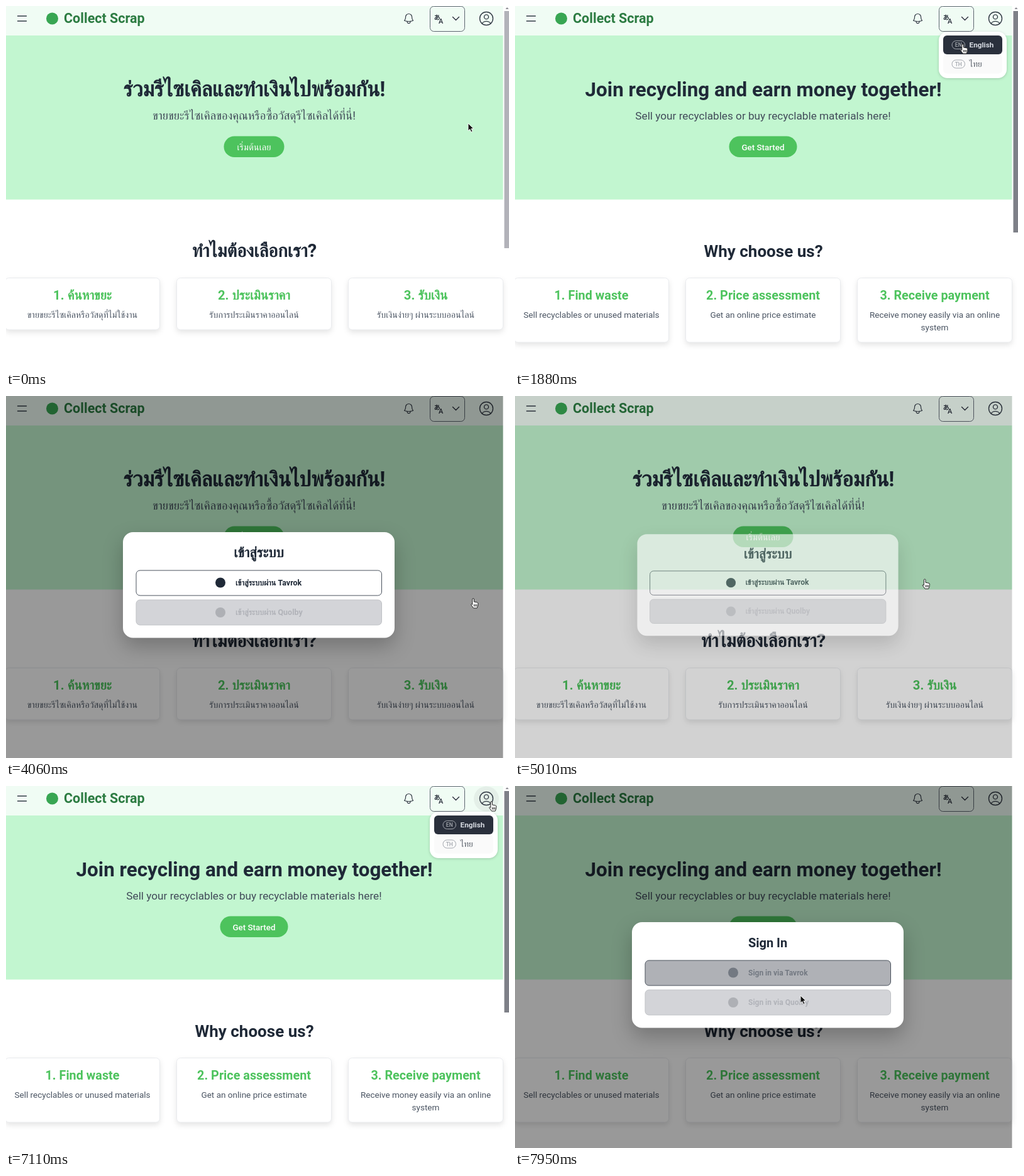
Write an HTML page that moves like this. It is 800 px wide and 577 px high and loops after 8000 ms.

```html
<!DOCTYPE html>
<html lang="th">
<head>
<meta charset="utf-8">
<style>
  html, body { margin: 0; width: 100%; height: 100%; overflow: hidden; background: #fff; }
  svg { display: block; width: 100vw; height: 100vh; }
  text { font-family: Roboto, 'Noto Sans', Loma, sans-serif; white-space: pre; }
  .line { fill: none; stroke: #323a45; stroke-width: 1.4; stroke-linecap: round; stroke-linejoin: round; }
  .card { fill: #fff; stroke: #e9ebee; filter: drop-shadow(0 4px 4px rgba(0, 0, 0, .1)); }
  #box { filter: drop-shadow(0 14px 16px rgba(0, 0, 0, .24)); }
  #menuBox { filter: drop-shadow(0 1px 2px rgba(0, 0, 0, .18)); }
  .badge { fill: none; stroke: #a3a7ae; }
</style>
</head>
<body>
<svg id="stage" viewBox="0 0 800 577"></svg>
<script>
const LOOP = 8000, DARK = '#1f2937', GREEN = '#4dc35d';
const stage = document.getElementById('stage');

const text = (x, y, size, weight, fill, str, anchor = 'middle') =>
  `<text x="${x}" y="${y}" font-size="${size}" font-weight="${weight}" fill="${fill}" text-anchor="${anchor}">${str}</text>`;
const rect = (x, y, w, h, r, attrs) =>
  `<rect x="${x}" y="${y}" width="${w}" height="${h}" rx="${r}" ${attrs}/>`;

const langs = {
  th: {
    size: { title: 33.8, sub: 18.6, start: 14.6, why: 29, head: 20.3, body: 14.2, signIn: 22, via: 12.5 },
    title: 'ร่วมรีไซเคิลและทำเงินไปพร้อมกัน!',
    sub: 'ขายขยะรีไซเคิลของคุณหรือซื้อวัสดุรีไซเคิลได้ที่นี่!',
    start: 'เริ่มต้นเลย', startW: 96, why: 'ทำไมต้องเลือกเรา?', cardH: 82.5,
    cards: [['1. ค้นหาขยะ', 'ขายขยะรีไซเคิลหรือวัสดุที่ไม่ใช้งาน'],
            ['2. ประเมินราคา', 'รับการประเมินราคาออนไลน์'],
            ['3. รับเงิน', 'รับเงินง่ายๆ ผ่านระบบออนไลน์']],
    signIn: 'เข้าสู่ระบบ', via: 'เข้าสู่ระบบผ่าน ', iconX: 341, viaX: 365
  },
  en: {
    size: { title: 31.4, sub: 17.2, start: 13.4, why: 26, head: 19.8, body: 13.55, signIn: 20, via: 12 },
    title: 'Join recycling and earn money together!',
    sub: 'Sell your recyclables or buy recyclable materials here!',
    start: 'Get Started', startW: 108, why: 'Why choose us?', cardH: 102.5,
    cards: [['1. Find waste', 'Sell recyclables or unused materials'],
            ['2. Price assessment', 'Get an online price estimate'],
            ['3. Receive payment', 'Receive money easily via an online', 'system']],
    signIn: 'Sign In', via: 'Sign in via ', iconX: 347, viaX: 371
  }
};

function page(id) {
  const L = langs[id], s = L.size;
  return `<g class="${id}">` +
    text(395, 144, s.title, 700, DARK, L.title) +
    text(394.5, 181, s.sub, 400, '#414b59', L.sub) +
    rect(394.5 - L.startW / 2, 207.5, L.startW, 33.5, 16.75, `fill="${GREEN}"`) +
    text(394.5, 229.5, s.start, 500, '#fff', L.start) +
    text(395, 399.5, s.why, 700, DARK, L.why) +
    L.cards.map(([head, ...lines], i) => {
      const x = -1.5 + 273 * i, mid = x + 123;
      return rect(x, 433.5, 246, L.cardH, 6, 'class="card"') +
        text(mid, 468, s.head, 700, GREEN, head) +
        lines.map((l, n) => text(mid, 497 + 20 * n, s.body, 400, '#4b5563', l)).join('');
    }).join('') + '</g>';
}

function dialog(id) {
  const L = langs[id], s = L.size;
  return `<g class="${id}">` + text(402, 257, s.signIn, 700, DARK, L.signIn) +
    `<g class="hub" fill="${DARK}"><circle cx="${L.iconX}" cy="297.5" r="8"/>` +
    text(L.viaX, 301.5, s.via, 700, 'inherit', L.via + 'Tavrok', 'start') + '</g>' +
    `<circle cx="${L.iconX}" cy="345" r="8" fill="#aeb0b5"/>` +
    text(L.viaX, 348.5, s.via, 700, '#b1b3b9', L.via + 'Quolby', 'start') + '</g>';
}

const item = (id, y, code, name, size, weight) => `<g id="${id}">` +
  rect(681, y, 94, 30, 6, 'class="fill"') + rect(695, y + 8.5, 20.5, 13, 6.5, 'class="badge"') +
  text(705.3, y + 18.2, 8.5, 500, '#a3a7ae', code) + text(722.5, y + 19, size, weight, 'inherit', name, 'start') + '</g>';

stage.innerHTML =
  rect(0, 0, 790.5, 47, 0, 'fill="#f0fcf4"') + rect(0, 47, 790.5, 261.5, 0, 'fill="#c2f6d0"') +
  '<path class="line" d="M18.5 16h14M18.5 24h14"/>' +
  '<circle cx="73.5" cy="20" r="9.5" fill="#38a653"/>' +
  text(92, 27, 21.5, 700, '#2c7c42', 'Collect Scrap', 'start') +
  '<path class="line" transform="translate(630.5 10) scale(.84)" d="M14.86 17.08a23.85 23.85 0 005.45-1.31A8.97 8.97 0 0118 9.75V9A6 6 0 006 9v.75a8.97 8.97 0 01-2.31 6.02c1.73.64 3.56 1.09 5.45 1.31m5.72 0a24.26 24.26 0 01-5.72 0m5.72 0a3 3 0 11-5.72 0"/>' +
  rect(674.5, .5, 55, 40, 6, 'id="langBtn" fill="#2a303c" stroke="#5d6570"') +
  '<g id="langIcon">' + text(685.5, 22, 10, 700, 'inherit', 'あ') + text(691.7, 28, 11, 500, 'inherit', 'A') +
  '<path class="line" id="chevron" d="M710.5 17.5l5 5 5-5"/></g>' +
  '<circle id="halo" cx="764" cy="20.5" r="20"/>' +
  '<g class="line"><circle cx="764" cy="20" r="10.5"/><circle cx="764" cy="17.4" r="3.5"/><path d="M757 27.9a8.74 8.74 0 0114 0"/></g>' +
  page('th') + page('en') +
  '<g id="menu">' + rect(674, 41, 108, 74, 14, 'id="menuBox" fill="#fff"') +
  item('itemEn', 47, 'EN', 'English', 11.8, 700) + item('itemTh', 77.5, 'TH', 'ไทย', 13.5, 400) + '</g>' +
  '<rect id="dim" width="790.5" height="577"/>' +
  '<g id="bar"><path d="M794.5 5l2.5-3 2.5 3z" fill="#8a8a90"/>' + rect(792.5, 8, 7.5, 378, 0, 'id="thumb"') + '</g>' +
  '<g id="modal">' + rect(186, 217, 432, 168.5, 16, 'id="box" fill="#fff"') +
  rect(207, 278, 390.5, 40, 6, 'id="hubBtn" stroke="#4a525d"') +
  rect(207, 325, 390.5, 40, 6, 'fill="#d3d4d8" stroke="#bfc1c5"') + dialog('th') + dialog('en') + '</g>' +
  '<path id="arrow" d="M0 0v12l2.8-2.6 2 4.6 2.2-1-2-4.4h3.8z" fill="#111" stroke="#fff" stroke-width=".9"/>' +
  '<path id="hand" d="M-1.2 8V1a1.3 1.3 0 012.6 0v4l5 1q1.6.4 1.5 2l-.6 4-1.2 3H.5L-3.5 9.5q.4-2 2.3 0zM1.5 9v3.5M3.5 9v3.5M5.5 9v3.5" fill="#fff" stroke="#222" stroke-width="1"/>';

const $ = id => document.getElementById(id);
const clamp = v => Math.min(1, Math.max(0, v));
// Rises over d ms from a and falls over d ms from b.
const pulse = (t, a, b, d = 200) => clamp((t - a) / d) - clamp((t - b) / d);
const mix = (a, b, k) => `rgb(${a.map((v, i) => Math.round(v + (b[i] - v) * k))})`;
const WHITE = [255, 255, 255], INK = [42, 48, 60], TEXT = [31, 41, 55];

// time, x, y of the pointer tip
const path = [
  [70, 735, 187], [330, 716, 62], [590, 703, 28], [830, 703, 28], [1410, 712, 61], [1980, 712, 61],
  [2240, 713, 90], [2600, 713, 90], [3020, 760, 21], [3400, 760, 21], [4060, 743, 323], [4180, 743, 323],
  [4260, 677, 309], [4430, 677, 309], [4540, 585, 300], [4730, 650, 304], [4930, 650, 304],
  [5580, 687, 29], [5850, 687, 29], [6200, 712, 61], [6480, 712, 61], [6800, 735, 242],
  [7110, 772, 25], [7380, 764, 22], [7950, 454, 334]
];
function pointer(t) {
  const i = path.findIndex(k => k[0] > t);
  if (i < 0) return path.at(-1).slice(1);
  if (i === 0) return path[0].slice(1);
  const [a, x, y] = path[i - 1], [b, u, v] = path[i];
  const k = (t - a) / (b - a), e = k * k * (3 - 2 * k);
  return [x + (u - x) * e, y + (v - y) * e];
}
const scaleAt = (x, y, s) => `translate(${x} ${y}) scale(${s}) translate(${-x} ${-y})`;

function draw(t) {
  const english = (t >= 1700 && t < 2380) || t >= 6400;
  for (const id of ['th', 'en'])
    document.querySelectorAll('.' + id).forEach(g => g.style.display = (id === 'en') === english ? '' : 'none');

  const lang = pulse(t, 480, 1050) + pulse(t, 5380, 6000);
  $('langBtn').setAttribute('fill-opacity', lang);
  const icon = mix(INK, [225, 228, 233], lang);
  $('langIcon').setAttribute('fill', icon);
  $('chevron').style.stroke = icon;
  $('halo').setAttribute('fill-opacity', .1 * pulse(t, 2960, 3420) + .05 * pulse(t, 7000, 7420, 100));

  const menu = pulse(t, 760, 3130) + pulse(t, 5790, 7360);
  $('menu').setAttribute('opacity', menu);
  $('menu').setAttribute('transform', scaleAt(728, 41, .95 + .05 * menu));
  for (const [id, on] of [['itemEn', english], ['itemTh', !english]]) {
    $(id).setAttribute('fill', on ? '#d5d9e0' : '#555c66');
    $(id).querySelector('.fill').setAttribute('fill', on ? '#2a303c' : '#fafafa');
  }

  const open = pulse(t, 3210, 4900) + pulse(t, 7390, LOOP + 500);
  const eased = 1 - (1 - open) ** 1.6;
  $('dim').setAttribute('opacity', .4 * open);
  $('modal').setAttribute('opacity', eased);
  $('modal').setAttribute('transform', scaleAt(402, 301, .9 + .1 * eased));

  const hub = pulse(t, 4480, 4560) + pulse(t, 7670, 7826);
  $('hubBtn').setAttribute('fill', mix(WHITE, INK, hub));
  document.querySelectorAll('.hub').forEach(g => g.setAttribute('fill', mix(TEXT, WHITE, hub)));

  $('bar').style.display = open > 0 ? 'none' : '';
  $('thumb').setAttribute('height', english ? 353 : 378);
  $('thumb').setAttribute('fill', mix([178, 178, 185], [126, 128, 136], t < 4000 ? clamp((t - 70) / 250) : clamp((t - 5100) / 300)));

  const [x, y] = pointer(t), hand = (t > 500 && t < 6560) || (t > 7000 && t < 7860);
  for (const [id, on] of [['hand', hand], ['arrow', !hand]]) {
    $(id).style.display = on ? '' : 'none';
    $(id).setAttribute('transform', `translate(${x} ${y})`);
  }
}

const start = performance.now();
(function frame() {
  draw((performance.now() - start) % LOOP);
  requestAnimationFrame(frame);
})();
</script>
</body>
</html>
```
